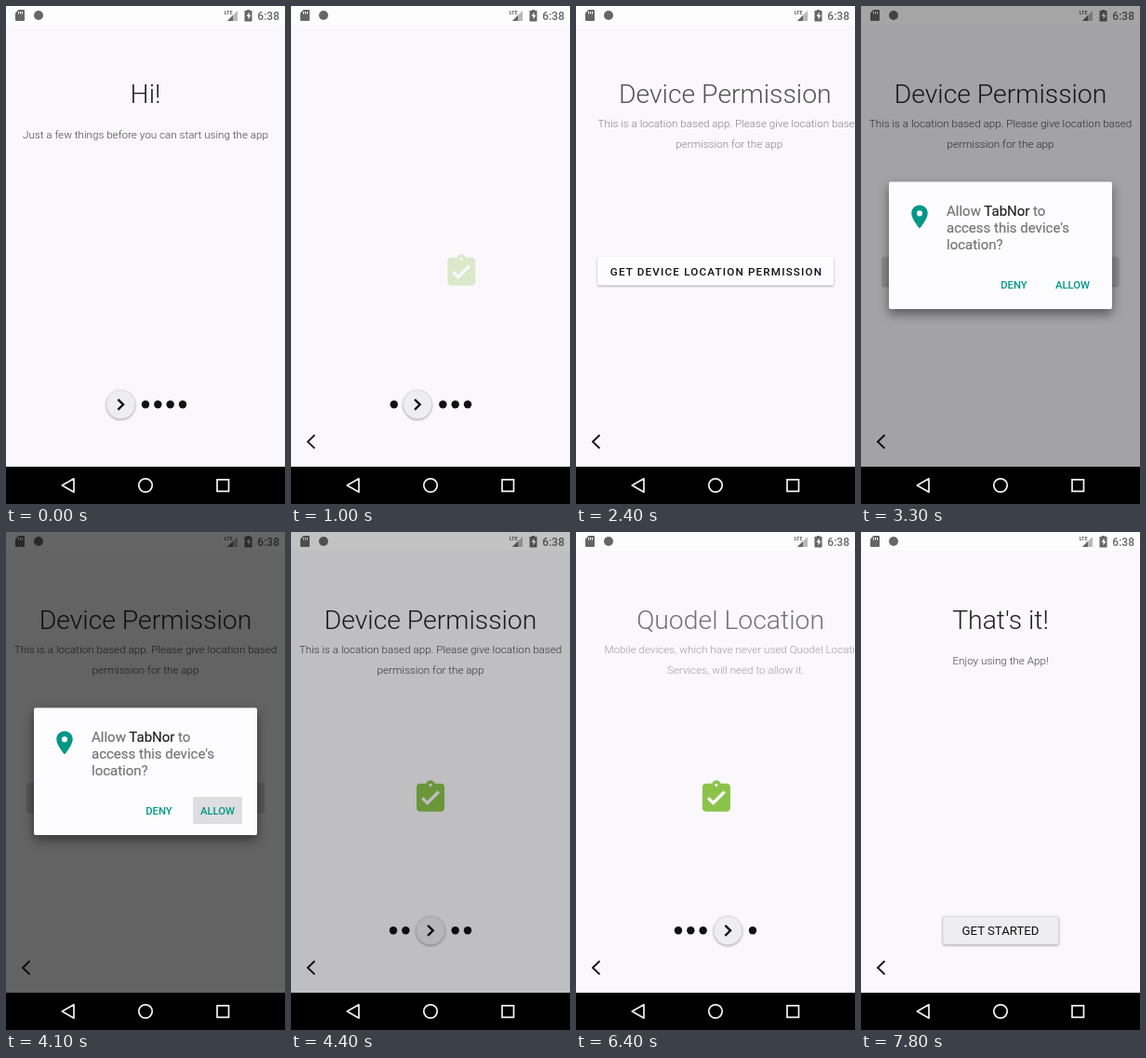
An HTML page for the animation above (8000 ms loop, 300 px wide and 534 px high).

```html
<!DOCTYPE html>
<html lang="en">
<head>
<meta charset="utf-8">
<title>App intro</title>
<style>
html, body { margin: 0; height: 100%; overflow: hidden; background: #faf8fc; }
svg { display: block; width: 100%; height: 100%; font-family: Roboto, sans-serif; }
.mid { text-anchor: middle; }
.title { font-size: 28.33px; font-weight: 300; fill: #222; }
.sub { font-size: 11.67px; font-weight: 300; fill: #444; }
.raised { filter: drop-shadow(0 1px 1px #0005); }
.line { fill: none; stroke: #111; }
</style>
</head>
<body>
<svg viewBox="0 0 300 534">
  <defs>
    <path id="check" fill="#8bc34a" transform="translate(130 264.7) scale(1.667)" d="M19 3h-4.18C14.4 1.84 13.3 1 12 1s-2.4.84-2.82 2H5c-1.1 0-2 .9-2 2v14c0 1.1.9 2 2 2h14c1.1 0 2-.9 2-2V5c0-1.1-.9-2-2-2zm-7 0a1 1 0 0 1 0 2 1 1 0 0 1 0-2zm-2 14l-4-4 1.41-1.41L10 14.17l6.59-6.59L18 9z"/>
  </defs>
  <rect width="300" height="534" fill="#faf8fc"/>
  <rect width="300" height="20" fill="#fdfdfd"/>

  <g fill="#666">
    <path d="M13.5 4H19q1 0 1 1v10q0 1-1 1h-8q-1 0-1-1V7.5z"/>
    <path d="M13.5 6v2.500M15.500 6v2.500M17.500 6v2.500" stroke="#fdfdfd"/>
    <circle cx="35" cy="10" r="5"/>
    <text x="234.700" y="9.300" font-size="5.500" font-weight="700">LTE</text>
    <path d="M249 5v11h-11z" opacity=".45"/>
    <path d="M244 10v6h-6z"/>
    <path d="M259 4h3v1h2.500v11.500h-8V5h2.500z"/>
    <path d="M261.500 6.500l-3 4.500h2v3.500l3-4.700h-2z" fill="#fdfdfd"/>
    <text x="294" y="14.500" font-size="12" font-weight="500" text-anchor="end">6:38</text>
  </g>

  <g id="pages"></g>
  <g id="icon1"><use href="#check"/></g>
  <g id="icon2">
    <g id="ask">
      <rect class="raised" x="23" y="269" width="254" height="30.500" rx="2" fill="#fdfcfe"/>
      <rect id="askPress" x="23" y="269" width="254" height="30.500" rx="2"/>
      <text class="mid" x="151" y="289" font-size="11.670" font-weight="500" letter-spacing="1.170" fill="#111">GET DEVICE LOCATION PERMISSION</text>
    </g>
    <use id="granted" href="#check"/>
  </g>
  <g id="icon3"><use href="#check"/></g>

  <g id="dots" fill="#111"></g>
  <g id="next">
    <rect id="face" class="raised" fill="#eeedef" stroke="#ccc" stroke-width=".5"/>
    <circle id="press" r="15"/>
    <path id="arrow" class="line" stroke-width="2.300" d="M-3-5.500L2.700 0-3 5.500"/>
  </g>
  <text id="start" class="mid" x="150" y="432" font-size="13.200" fill="#111">GET STARTED</text>
  <path id="back" class="line" stroke-width="1.900" d="M25.500 460L18 467.200l7.500 7.200"/>

  <rect id="dim" width="300" height="494"/>
  <g id="dialog">
    <rect x="30" y="188.500" width="240" height="136.500" rx="2" fill="#fdfcfe" style="filter:drop-shadow(0 5px 6px #0007)"/>
    <path fill="#009688" transform="translate(48 211) scale(1.25)" d="M12 2C8.130 2 5 5.130 5 9c0 5.250 7 13 7 13s7-7.750 7-13c0-3.870-3.130-7-7-7zm0 9.500a2.500 2.500 0 0 1 0-5 2.500 2.500 0 0 1 0 5z"/>
    <g font-size="15" fill="#757575" stroke="#757575" stroke-width=".2">
      <text x="92" y="224.500">Allow <tspan fill="#222" stroke="#222">TabNor</tspan> to</text>
      <text x="92" y="242.500">access this device's</text>
      <text x="92" y="260.500">location?</text>
    </g>
    <rect id="allowPress" x="201" y="284" width="53" height="29" rx="2"/>
    <g class="mid" font-size="11.300" font-weight="500" fill="#009688">
      <text x="164.500" y="303">DENY</text>
      <text x="227.500" y="303">ALLOW</text>
    </g>
  </g>

  <rect y="494" width="300" height="40"/>
  <g fill="none" stroke="#f4f4f4" stroke-width="1.700">
    <path d="M60.300 514l12.700-7.200v14.400z" stroke-linejoin="round"/>
    <circle cx="150" cy="514" r="7.200"/>
    <path d="M227 507.800h12.500v12.500H227z"/>
  </g>
</svg>
<script>
const LOOP = 8000, STEP = 100, GAP = 13.33;
const TURNS = [600, 1650, 5700, 6800]; // start of each page change
const PAGES = [
  ["Hi!", "Just a few things before you can start using the app"],
  ["Service Availability", "This app uses Quodel Hive Services based API. In order to", "function properly your device should have the appropriate"],
  ["Device Permission", "This is a location based app. Please give location based", "permission for the app"],
  ["Quodel Location", "Mobile devices, which have never used Quodel Location", "Services, will need to allow it."],
  ["That's it!", "Enjoy using the App!"]
];

const $ = id => document.getElementById(id);
const clamp = (v, lo = 0, hi = 1) => Math.min(hi, Math.max(lo, v));
const mix = (a, b, p) => a + (b - a) * p;
const smooth = p => p * p * (3 - 2 * p);
const fade = (el, v) => el.setAttribute("opacity", v);
const attrs = (el, o) => { for (const k in o) el.setAttribute(k, o[k]); };

$("pages").innerHTML = PAGES.map(([title, ...lines], i) => {
  const y = lines.length > 1 ? 130.3 : 142;
  const text = lines.map((s, n) => `<text x="150" y="${y + n * 22}">${s}</text>`).join("");
  return `<text id="title${i}" class="mid title" x="150" y="104">${title}</text><g id="sub${i}" class="mid sub">${text}</g>`;
}).join("");
$("dots").innerHTML = '<circle cy="427.2" r="4.2"/>'.repeat(5);
const dots = [...$("dots").children];

function draw(t) {
  const ramp = (from, to) => clamp((t - from) / (to - from));
  const pulse = (from, to) => Math.sin(Math.PI * ramp(from, to));

  // pages leave to the left speeding up and arrive from the right slowing down
  function place(id, i, lateIn, lateOut) {
    const a = TURNS[i - 1] + 500 + lateIn, z = TURNS[i] + lateOut;
    const p = i > 0 ? ramp(a, a + 450) : 1;
    const q = i < 4 ? ramp(z, z + 250) : 0;
    $(id).setAttribute("transform", `translate(${52 * ((1 - p) ** 2 - q * q)} 0)`);
    fade($(id), clamp(1.4 * p) * clamp(2 - 2 * q));
  }
  PAGES.forEach((_, i) => {
    place("title" + i, i, 0, 0);
    place("sub" + i, i, 40, 40);
    if (i % 4) place("icon" + i, i, -190, -60);
  });

  const granted = ramp(4200, 4350);
  fade($("ask"), 1 - granted);
  fade($("granted"), granted);
  fade($("askPress"), 0.15 * ramp(2850, 3200));

  // stepper
  const page = TURNS.reduce((sum, s) => sum + smooth(ramp(s + 100, s + 450)), 0);
  const size = t < 3000 ? 1 - ramp(1600, 1850) : ramp(4180, 4380);
  const solid = clamp((size - 0.65) / 0.35);
  const wide = smooth(ramp(6900, 7400));
  const nudge = t < 3000 ? 7 * (size - 1) : 0;
  const x = mix(123.4 + GAP * page, 150.3, wide) + nudge;
  const w = mix(31, 124.5, wide), h = mix(31, 30, wide);

  dots.forEach((dot, j) => {
    const near = j - page;
    dot.setAttribute("cx", 110 + GAP * (j + clamp(near + 1, 0, 2)));
    fade(dot, solid * (1 - wide) * clamp(Math.abs(near) * 2));
  });
  $("next").setAttribute("transform", `translate(${x} 427.3) scale(${size})`);
  attrs($("face"), { x: -w / 2, y: -h / 2, width: w, height: h, rx: mix(15.5, 2, wide), "fill-opacity": solid });
  fade($("arrow"), solid * clamp(1 - 2 * wide));
  fade($("press"), 0.12 * (pulse(150, 700) + pulse(1450, 1620) + pulse(5650, 6100) + pulse(6650, 6950)));
  fade($("start"), ramp(7400, 7750));
  fade($("back"), clamp(page));

  // permission dialog
  const open = ramp(3140, 3290);
  const zoom = mix(0.9, 1, open);
  fade($("dim"), 0.6 * (ramp(3160, 3400) - ramp(4245, 4500)));
  fade($("dialog"), open * (1 - ramp(4100, 4300)));
  $("dialog").setAttribute("transform", `translate(150 257) scale(${zoom}) translate(-150 -257)`);
  fade($("allowPress"), 0.12 * ramp(3550, 3850));
}

function tick() {
  draw(Math.floor(performance.now() % LOOP / STEP) * STEP);
  requestAnimationFrame(tick);
}
tick();
</script>
</body>
</html>
```
